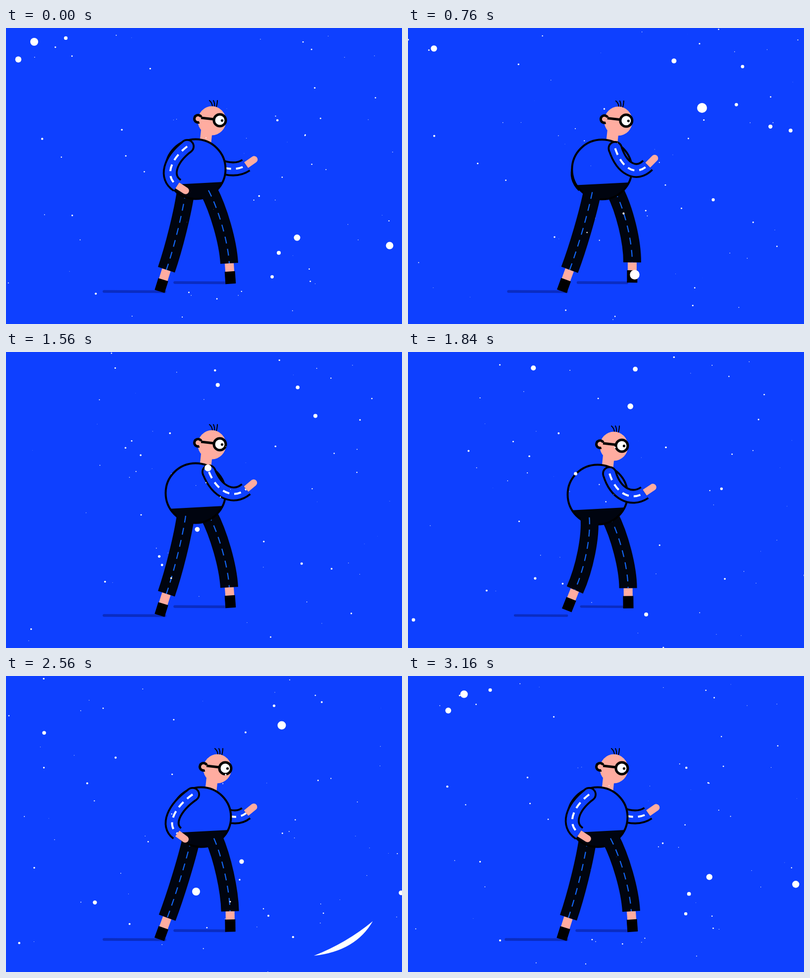
These frames come from a looping animation (800x600 px, 3200 ms). An HTML page with a canvas:

```html
<!DOCTYPE html>
<html lang="en">
<head>
<meta charset="utf-8">
<title>Space shuffle</title>
<style>
html, body { margin: 0; width: 100%; height: 100%; overflow: hidden; background: #0e40ff; }
canvas { display: block; }
</style>
</head>
<body>
<canvas id="stage" width="800" height="600"></canvas>
<script>
const ctx = document.getElementById('stage').getContext('2d');
const LOOP = 3200, HALF = LOOP / 2, STEP = 40, COUNT = LOOP / STEP, TAU = Math.PI * 2, RAD = Math.PI / 180;
const BLUE = '#0e40ff', SKIN = '#ffaca0', INK = '#000', CLOTH = '#00040f', SEAM = '#1466f5', SHADE = '#0a2cc2';
const VP = { x: 900, y: 160 }, HOME = 383;

const clamp = v => Math.max(0, Math.min(1, v));
const lerp = (a, b, k) => a + (b - a) * k;
const smooth = v => { v = clamp(v); return v * v * (3 - 2 * v); };
// Rises before a moment and falls after it
const bump = (t, at, rise, fall) => smooth(1 - Math.abs(t - at) / (t < at ? rise : fall));
// Smooth path through three poses at u = 0, .5 and 1
const blend = (a, b, c, u) => a.map((p, i) => p.map((v, j) =>
  v * (1 - u) * (1 - 2 * u) + b[i][j] * 4 * u * (1 - u) + c[i][j] * u * (2 * u - 1)));

// Legs: hip (from body), knee, cuff, shoe
const BACK = [[-20, 46], [347, 410], [324, 490], [314, 522]];
const FRONT = [[26, 43], [437, 402], [451, 477], [453, 506]];
const DRAG = [[2, 42], [394, 420], [382, 490], [371, 516]];
const LIFT = [[11, 47], [450, 388], [434, 440], [416, 457]];

// Arms: shoulder (from body), elbow, cuff
const HIP = [[-17, -46], [333, 284], [346, 319]];
const REACH = [[27, -43], [444, 284], [485, 278]];
const RAISE = [[8, -41], [406, 318], [434, 290]];
const LOWER = [[-1, -41], [373, 307], [410, 331]];

function bodyAt(t, swap) {
  const lean = bump(t, 1040, 160, 340);
  return {
    x: HOME + 11 * bump(t % HALF, 960, 700, 560) - 44 * lean,
    y: 286 + 18 * swap - 6 * lean,
    lean
  };
}

function paint(width, color, cap = 'butt', dash = []) {
  ctx.lineWidth = width;
  ctx.strokeStyle = color;
  ctx.lineCap = cap;
  ctx.setLineDash(dash);
  ctx.stroke();
  ctx.setLineDash([]);
}
function line(a, b, width, color, cap) {
  ctx.beginPath();
  ctx.moveTo(...a);
  ctx.lineTo(...b);
  paint(width, color, cap);
}
function dot(x, y, r, color) {
  ctx.beginPath();
  ctx.arc(x, y, r, 0, TAU);
  ctx.fillStyle = color;
  ctx.fill();
}
// Limb curve from a to b through m; returns its direction at b
function bow(a, m, b) {
  const handle = side => a.map((v, i) =>
    (m[i] - (v + b[i]) / 8) / .75 + side * .22 * (b[i] - v));
  const end = handle(1);
  ctx.beginPath();
  ctx.moveTo(...a);
  ctx.bezierCurveTo(...handle(-1), ...end, ...b);
  return Math.atan2(b[1] - end[1], b[0] - end[0]);
}

function drawLeg([h, k, c, s], b, forward) {
  const dx = b.x - HOME, bend = b.lean * forward;
  const hip = [b.x + h[0], b.y + h[1]];
  const knee = [k[0] + dx * .5 - bend * 8, k[1]];
  const cuff = [c[0] + dx * .15 - bend * 5, c[1] + bend * 5];
  const shoe = [s[0], s[1] + bend * 7];
  line(cuff, shoe, 18, SKIN);
  ctx.save();
  ctx.translate(...shoe);
  ctx.rotate(Math.atan2(cuff[0] - shoe[0], shoe[1] - cuff[1]));
  ctx.fillStyle = INK;
  ctx.fillRect(-10.5, -12.5, 21, 25);
  ctx.restore();
  bow(hip, knee, cuff);
  paint(36, CLOTH);
  paint(2.2, SEAM, 'butt', [14, 11]);
}

// spread pulls the shoulder towards the middle of the body
function drawArm([s, e, c], b, spread, tuck) {
  const top = [b.x + s[0] * spread, b.y + s[1] * spread];
  const elbow = [e[0] + (b.x - HOME) * .5 - b.lean * 8 + tuck, e[1] - b.lean * 18];
  const cuff = [c[0] - b.lean * 8 + tuck, c[1] - b.lean * 11];
  const aim = bow(top, elbow, cuff);
  line(cuff, [cuff[0] + 20 * Math.cos(aim), cuff[1] + 20 * Math.sin(aim)], 14, SKIN, 'round');
  dot(...top, 15, INK);
  bow(top, elbow, cuff);
  paint(30, INK);
  dot(...top, 11.2, BLUE);
  bow(top, elbow, cuff);
  paint(22.4, BLUE);
  paint(4, '#fff', 'butt', [14, 10]);
}

function drawTorso(b) {
  ctx.save();
  ctx.translate(b.x, b.y);
  dot(0, 0, 61, BLUE);
  ctx.save();
  ctx.clip();
  ctx.rotate(-3 * RAD);
  ctx.fillStyle = CLOTH;
  ctx.fillRect(-70, 29, 140, 50);
  ctx.restore();
  ctx.beginPath();
  ctx.arc(0, 0, 60.5, 0, TAU);
  paint(4, INK);
  ctx.restore();
}

const headAt = b => [b.x + 33 - 19 * b.lean, b.y - 98 - 2 * b.lean];

function drawNeck(b) {
  const [x, y] = headAt(b);
  line([x - 10 + 13 * b.lean, y + 14], [b.x + 20 - 2 * b.lean, b.y - 55], 23, SKIN);
}

function drawHead(b) {
  ctx.save();
  ctx.translate(...headAt(b));
  ctx.rotate(-25 * RAD * b.lean);
  for (let i = 0; i < 3; i++) {
    ctx.beginPath();
    ctx.moveTo(1 + 4 * i, -28);
    ctx.quadraticCurveTo(1 + 5 * i, -36, 8 * i - 5, -41);
    paint(2, INK, 'round');
  }
  ctx.beginPath();
  ctx.ellipse(0, 0, 28.5, 29.5, 0, 0, TAU);
  ctx.fillStyle = SKIN;
  ctx.fill();
  dot(-27, -3, 8, SKIN);
  dot(16, -1, 12, '#fff');
  dot(20.5, -.5, 2.6, INK);
  // Glasses pivot at the ear
  ctx.translate(-28 - 4 * b.lean, -4);
  ctx.rotate(-14 * RAD * b.lean);
  ctx.beginPath();
  ctx.arc(0, 0, 7.5, 70 * RAD, 330 * RAD);
  paint(5, INK);
  line([6, -2], [32, 1], 5, INK);
  ctx.beginPath();
  ctx.arc(44, 3, 12, 0, TAU);
  paint(5, INK);
  ctx.restore();
}

function drawShadows(swap) {
  const width = lerp(5.5, 1.5, swap);
  line([lerp(198, 309, swap), 534], [321, 534.5], width, SHADE, 'round');
  line([lerp(341, 395, swap), 516], [lerp(444, 407, swap), 516.5], width, SHADE, 'round');
}

let seed = 11;
const rand = () => (seed = seed * 16807 % 2147483647) / 2147483647;
const stars = [];
const addStar = (at, x, y, r, z, past) => stars.push({ at, x, y, r, z, past });

// The brightest stars, each at the moment it stands out
[[0, 57, 28, 8], [0, 588, 425, 6.5], [0, 775, 441, 7.5], [480, 747, 161, 7.5], [480, 679, 330, 6],
 [1040, 356, 20, 9.5], [1560, 408, 235, 7], [2080, 98, 284, 5.5], [2560, 557, 100, 8.5], [2560, 384, 437, 8]]
  .forEach(([at, x, y, r]) => addStar(at, x, y, r, 14, 14));
for (let i = 0; i < 30; i++)
  addStar(rand() * LOOP, 820 * Math.sqrt(rand()), 600 * rand(), 2.2 + 2.6 * rand(), 12 + 14 * rand(), 14);
for (let i = 0; i < 80; i++)
  addStar(rand() * LOOP, 840 * rand() - 20, 640 * rand() - 20, .5 + 1.5 * rand() ** 2, 45 + 180 * rand(), 40);

// Steps since a moment, wrapped around the loop
const since = (t, at, past) => ((t - at) / STEP + past + 2 * COUNT) % COUNT - past;

function drawStars(t) {
  for (const s of stars) {
    const n = since(t, s.at, s.past), z = s.z - n;
    if (z < .5) continue;
    const k = s.z / z, fade = clamp((n + s.past) / 10) * clamp((COUNT - s.past - n) / 6);
    dot(lerp(VP.x, s.x, k), lerp(VP.y, s.y, k), Math.min(10, s.r * k ** .7) * fade, '#fff');
  }
}

// Crescents: moment, tip, outer bend, inner bend, tip
const STREAKS = [
  [480, [366, -2], [368, 10], [363, 9], [357, 20]],
  [1040, [452, 162], [520, 201], [502, 210], [411, 274]],
  [2560, [622, 567], [706, 558], [688, 541], [741, 497]]
];
function drawStreaks(t) {
  for (const [at, a, outer, inner, c] of STREAKS) {
    const n = since(t, at, COUNT / 2);
    if (Math.abs(n) > 3) continue;
    const k = 10 / (10 - n), thin = 1 - Math.abs(n) / 4;
    ctx.save();
    ctx.translate(VP.x, VP.y);
    ctx.scale(k, k);
    ctx.translate(-VP.x, -VP.y);
    ctx.beginPath();
    ctx.moveTo(...a);
    ctx.quadraticCurveTo(...outer, ...c);
    ctx.quadraticCurveTo(...inner.map((v, i) => lerp(outer[i], v, thin)), ...a);
    ctx.fillStyle = '#fff';
    ctx.fill();
    ctx.restore();
  }
}

function draw(t) {
  const u = smooth((t % HALF - 160) / 640), swap = 4 * u * (1 - u);
  const b = bodyAt(t, swap);
  const nearForward = t < HALF ? u : 1 - u;
  const toBack = blend(FRONT, DRAG, BACK, u), toFront = blend(BACK, LIFT, FRONT, u);
  const rise = blend(HIP, RAISE, REACH, u), fall = blend(REACH, LOWER, HIP, u);
  // Limbs trade places in each half of the loop
  const [nearLeg, farLeg, nearArm, farArm] = t < HALF
    ? [toBack, toFront, rise, fall] : [toFront, toBack, fall, rise];

  ctx.fillStyle = BLUE;
  ctx.fillRect(0, 0, 800, 600);
  drawShadows(swap);
  drawArm(farArm, b, .6, 8 * nearForward);
  drawLeg(farLeg, b, nearForward);
  drawNeck(b);
  drawTorso(b);
  drawLeg(nearLeg, b, 1 - nearForward);
  drawArm(nearArm, b, 1, 0);
  drawHead(b);
  drawStreaks(t);
  drawStars(t);
}

const start = performance.now();
function tick() {
  const t = (performance.now() - start) % LOOP;
  draw(Math.floor(t / STEP) * STEP);
  requestAnimationFrame(tick);
}
tick();
</script>
</body>
</html>
```
